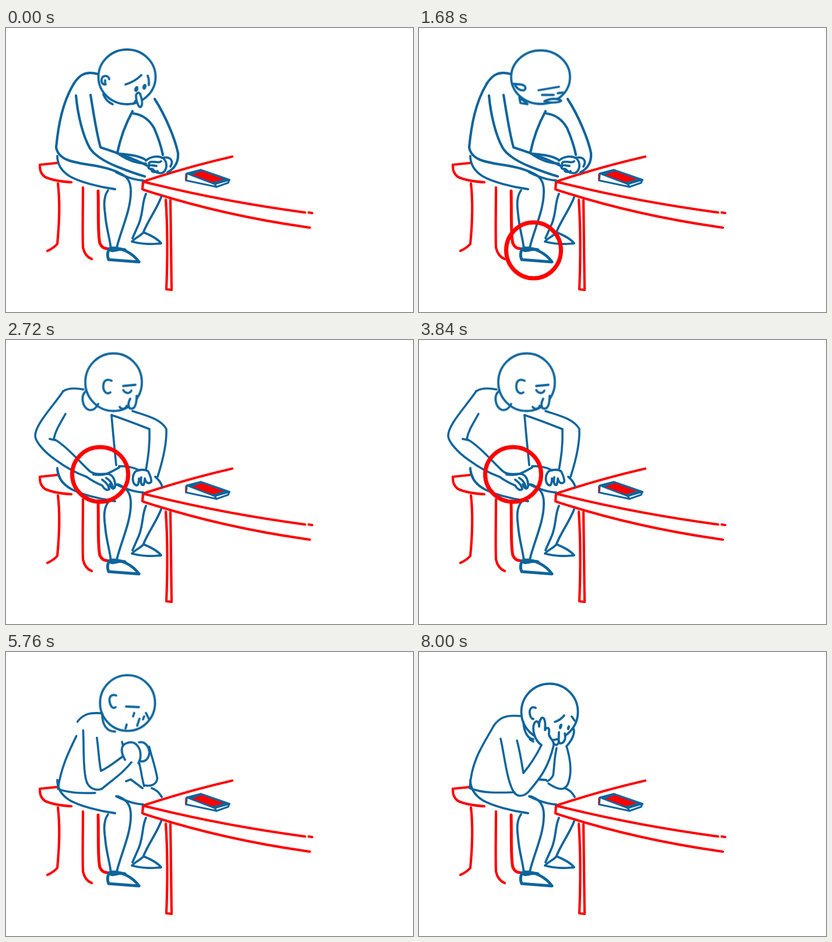
An HTML page without scripts that plays this animation: 698x488 px, repeating every 8.24 s.

```html
<!DOCTYPE html>
<html lang="en">
<head>
<meta charset="utf-8">
<title>Waiting by the phone</title>
<style>
html, body { margin: 0; width: 100%; height: 100%; overflow: hidden; background: #fff; }
svg { display: block; width: 100%; height: 100%; }
path, ellipse { fill: none; stroke-linecap: round; stroke-linejoin: round; }
.blue { stroke: #0d659c; stroke-width: 3.8; }
.red { stroke: #f00; stroke-width: 4.2; }
.ring { stroke: #f00; stroke-width: 7; }
.white { fill: #fff; }
.ink { fill: #0d659c; stroke: none; }
.bold { stroke-width: 5; }
.fine { stroke-width: 3.3; }

/* body strokes: a hands clasped, b fiddling, c hands on knees, d fists, e head in hands */
.limb { animation: pose 8.24s infinite; }
@keyframes pose {
  0%, 21.36% { d: var(--a); stroke-width: 4.2; animation-timing-function: ease-in-out; }
  25.24%, 27.18% { d: var(--b); stroke-width: 3.7; animation-timing-function: cubic-bezier(.4, 0, .4, 1.4); }
  33.01%, 65.05% { d: var(--c); stroke-width: 3.6; animation-timing-function: cubic-bezier(.4, -.4, .3, 1); }
  72.8%, 91.26% { d: var(--d); stroke-width: 3.6; animation-timing-function: ease-in-out; }
  97.09%, 100% { d: var(--e); stroke-width: 3.6; }
}

.head { animation: head 8.24s ease-in-out infinite; }
@keyframes head {
  0%, 7.77% { transform: translate(207.5px, 84px); }
  10.68%, 21.36% { transform: translate(208.5px, 84.5px); }
  25.24%, 27.18% { transform: translate(203px, 71.5px); }
  30.1% { transform: translate(191px, 59px); }
  33.01%, 47.57% { transform: translate(184.5px, 72.5px); }
  50.49%, 65.05% { transform: translate(186px, 72px); }
  72.8%, 91.26% { transform: translate(217.5px, 94px); }
  93.69% { transform: translate(221px, 90px); }
  97.09%, 100% { transform: translate(224px, 103px); }
}
.skull { animation: skull 8.24s ease-in-out infinite; }
@keyframes skull {
  0%, 7.77% { rx: 49px; ry: 47px; }
  10.68%, 21.36% { rx: 50.5px; ry: 46px; }
  25.24%, 47.57% { rx: 48.5px; ry: 49.5px; }
  50.49%, 65.05% { rx: 50px; ry: 51px; }
  72.8%, 91.26% { rx: 46px; ry: 46.5px; }
  97.09%, 100% { rx: 48.5px; ry: 48.5px; }
}

/* hard swaps */
.cut { opacity: 0; animation: 8.24s step-end infinite; }
@keyframes face1 { 0% { opacity: 1; } 8.74%, 100% { opacity: 0; } }
@keyframes face2 { 0% { opacity: 0; } 8.74% { opacity: 1; } 23.3%, 100% { opacity: 0; } }
@keyframes face3 { 0% { opacity: 0; } 23.3% { opacity: 1; } 29.13%, 100% { opacity: 0; } }
@keyframes face4 { 0% { opacity: 0; } 29.13% { opacity: 1; } 48.54%, 100% { opacity: 0; } }
@keyframes face5 { 0% { opacity: 0; } 48.54% { opacity: 1; } 68.93%, 100% { opacity: 0; } }
@keyframes face6 { 0% { opacity: 0; } 68.93% { opacity: 1; } 93.2%, 100% { opacity: 0; } }
@keyframes face7 { 0% { opacity: 0; } 93.2%, 100% { opacity: 1; } }
@keyframes clasp { 0% { opacity: 1; } 23.3%, 100% { opacity: 0; } }
@keyframes fiddle { 0% { opacity: 0; } 23.3% { opacity: 1; } 30.1%, 100% { opacity: 0; } }
@keyframes knees { 0% { opacity: 0; } 30.1% { opacity: 1; } 68.93%, 100% { opacity: 0; } }
@keyframes ringFoot { 0% { opacity: 0; } 8.74% { opacity: 1; } 29.13%, 100% { opacity: 0; } }
@keyframes ringHand { 0% { opacity: 0; } 32.04% { opacity: 1; } 66.02%, 100% { opacity: 0; } }
@keyframes toeUp {
  0% { opacity: 0; } 10.68% { opacity: 1; } 12.62% { opacity: 0; } 14.56% { opacity: 1; }
  16.5% { opacity: 0; } 18.45% { opacity: 1; } 20.39%, 100% { opacity: 0; }
}
@keyframes toeDown {
  0% { opacity: 1; } 10.68% { opacity: 0; } 12.62% { opacity: 1; } 14.56% { opacity: 0; }
  16.5% { opacity: 1; } 18.45% { opacity: 0; } 20.39%, 100% { opacity: 1; }
}

/* hands travelling into place */
.slide { animation: 8.24s ease-out infinite; }
@keyframes toKnee { 0%, 30.1% { transform: translate(28px, -4px); } 33.01%, 100% { transform: none; } }
@keyframes toChin { 0%, 68.93% { transform: translate(-16px, 28px); } 72.8%, 100% { transform: none; } }
.drum { transform-origin: 145px 232px; animation: drum 8.24s step-end infinite; }
@keyframes drum {
  0% { transform: none; } 36.89% { transform: rotate(-9deg); } 38.83% { transform: none; }
  42.72% { transform: rotate(-9deg); } 44.66% { transform: none; }
  52.43% { transform: rotate(-9deg); } 54.37% { transform: none; }
  58.25% { transform: rotate(-9deg); } 59.22%, 100% { transform: none; }
}
</style>
</head>
<body>
<svg viewBox="0 0 698 488" preserveAspectRatio="none">
  <!-- stool and table -->
  <g class="red">
    <path d="M87 232L58 235C58 245 60 251 67 256C80 262 96 264 112 265"/>
    <path d="M89 267C93 300 91 340 88 371Q82 378 71 383"/>
    <path d="M132 274C132 310 131 350 132 377Q135 392 147 397"/>
    <path class="bold" d="M158 280C159 320 157 355 161 370Q165 379 173 379"/>
    <path d="M388 221C340 232 280 249 235 264L234 277"/>
    <path d="M235 264Q370 298 513 317M519 317L525 318"/>
    <path d="M236 278Q370 322 521 343"/>
    <path d="M274 295C277 340 277 400 275 449L284 450C283 400 283 350 282 296"/>
  </g>

  <!-- phone -->
  <g class="blue fine">
    <path class="white" d="M310 250L334 244L383 261L381 266L361 273L309 262Z"/>
    <path style="fill:#0d659c" d="M311 250L334 244L383 261L358 268Z"/>
    <path style="fill:red;stroke:none" d="M319 252L336 246L374 260L354 265Z"/>
    <path d="M358 268L361 273"/>
    <path style="stroke:red;stroke-width:1.6" d="M308 251V262"/>
  </g>

  <!-- legs and shoes -->
  <g class="blue">
    <path d="M88 220C88 236 96 246 108 254C124 264 158 273 187 277"/>
    <path d="M192 248C208 254 215 264 214 284C213 315 198 345 190 377"/>
    <path d="M175 279C167 290 168 305 170 320C172 345 178 360 180 380"/>
    <path d="M240 285C233 300 236 315 228 336L217 361M266 291C258 312 244 330 236 350"/>
    <path d="M189 248C205 256 220 261 235 262"/>
    <path d="M236 351C245 355 258 360 266 370C250 372 230 371 216 367C222 360 230 358 236 351Z"/>
    <g class="cut" style="animation-name:toeDown">
      <path class="white bold" d="M181 378C197 377 217 386 228 402L176 398C173 391 174 385 177 379C181 388 192 377 204 381"/>
    </g>
    <g class="cut" style="animation-name:toeUp">
      <path class="white bold" d="M180 377L179 395L240 372C215 371 195 380 184 383"/>
      <path class="ink" d="M180 391C200 385 220 377 240 371C215 388 200 393 179 397Z"/>
    </g>
  </g>

  <!-- torso -->
  <g class="blue">
    <path class="limb" style="
      --a:path('M157 79C135 73 125 82 116 96');
      --b:path('M152 69C122 70 100 80 90 97');
      --c:path('M133 85C118 82 106 83 98 88');
      --d:path('M173 110C150 108 138 112 128 127');
      --e:path('M173 110C150 108 138 112 128 127')"/>
    <path class="limb" style="
      --a:path('M116 96C97 128 90 165 86 205C92 240 150 228 192 248');
      --b:path('M90 97C75 130 80 170 88 210C97 238 150 229 192 248');
      --c:path('M88 222C89 228 91 234 94 240C99 247 105 252 112 256');
      --d:path('M128 127C112 158 95 190 88 234C105 240 135 241 162 239');
      --e:path('M128 127C110 160 90 185 87 234C110 243 135 242 164 241')"/>
    <path class="limb" style="
      --a:path('M217 143C205 165 196 190 191 214');
      --b:path('M197 134C193 160 188 185 185 217');
      --c:path('M181 129C183 155 186 185 189 215');
      --d:path('M203 160C206 166 208 170 210 175');
      --e:path('M190 150C192 152 194 153 196 154')"/>
  </g>

  <!-- head -->
  <g class="head blue">
    <ellipse class="skull white" rx="49" ry="47"/>
    <g class="cut" style="animation-name:face1"><g transform="translate(-207.5 -84)">
      <path d="M177 88C176 81 166 80 164 88C163 95 167 98 171 97M170 90V96"/>
      <path d="M167 114C170 122 176 128 183 131"/>
      <path d="M205 97C215 94 225 88 232 81M243 82C246 88 245 92 245 98"/>
      <path class="ink" d="M220 108C219 100 227 97 227 103C227 109 223 112 220 108ZM234 104C233 96 241 93 241 100C240 106 237 108 234 104Z"/>
      <path class="white" d="M224 113C221 118 226 135 230 136C235 134 234 125 230 113C228 110 226 111 224 113Z"/>
      <path d="M219 130L223 124"/>
    </g></g>
    <g class="cut" style="animation-name:face2"><g transform="translate(-208.5 -84.5)">
      <path d="M162 96L174 97C184 98 184 105 180 107C172 108 168 103 165 99"/>
      <path d="M172 119C178 126 184 126 186 131L174 129Z"/>
      <path d="M205 107L240 101M211 115L231 115M238 112L247 111"/>
      <path class="white" d="M215 126C225 120 240 121 244 125C240 129 222 129 215 126Z"/>
    </g></g>
    <g class="cut" style="animation-name:face3"><g transform="translate(-203 -71.5)">
      <ellipse cx="167" cy="76" rx="4.5" ry="9"/>
      <path d="M150 75C143 85 146 108 155 112C160 118 160 115 166 109"/>
      <path d="M196 87C205 82 210 81 217 80M189 93L202 97M235 90L242 100M226 101L236 104"/>
      <path class="ink" d="M188 105L206 111L207 119Z"/>
      <path class="white" d="M207 107C208 122 215 126 217 120L218 105"/>
    </g></g>
    <g class="cut" style="animation-name:face4"><g transform="translate(-184.5 -72.5)">
      <path d="M181 70C172 66 166 70 167 82C168 90 174 94 179 90"/>
      <path d="M137 88C128 95 130 115 142 120C150 122 155 116 158 110"/>
      <path d="M201 79L222 77M201 86C205 92 212 93 215 87"/>
      <path class="white" d="M213 101C208 110 210 118 215 118C222 118 224 108 224 96"/>
      <path d="M195 115C198 120 205 119 207 113"/>
    </g></g>
    <g class="cut" style="animation-name:face5"><g transform="translate(-186 -72)">
      <path d="M162 61C155 58 150 62 152 72C153 80 158 82 160 79"/>
      <path d="M137 87C128 95 130 115 142 120C150 122 155 116 159 112"/>
      <path class="bold" d="M182 70C190 70 198 66 203 66"/>
      <path d="M224 76C230 82 226 90 232 94M195 92C190 105 192 112 197 112C203 110 203 100 204 90"/>
      <path class="ink" d="M189 84C189 77 195 75 195 80C194 85 191 87 189 84ZM211 94C211 87 217 85 217 90C216 95 213 97 211 94Z"/>
      <path class="fine" d="M178 111C183 108 188 110 190 115"/>
    </g></g>
    <g class="cut" style="animation-name:face6"><g transform="translate(-217.5 -94)">
      <path d="M198 81C189 78 185 84 187 93C189 102 194 104 197 101"/>
      <path d="M174 112C174 132 182 143 196 143"/>
      <path d="M215 100L237 101M229 111L227 117M238 121L234 133M246 117L244 122M249 111L254 121M216 131L214 138"/>
    </g></g>
    <g class="cut" style="animation-name:face7"><g transform="translate(-224 -103)">
      <path d="M200 96C192 92 189 100 190 106C191 112 193 115 196 115"/>
      <path d="M179 120C180 140 188 149 196 150"/>
      <path d="M233 120C240 118 245 114 249 109M262 111L267 118"/>
      <path class="ink" d="M240 131C239 124 246 120 246 126C245 132 242 135 240 131ZM254 133C253 126 259 123 259 129C258 134 256 136 254 133Z"/>
      <path class="white" d="M240 138C240 150 238 156 242 157C250 157 252 148 250 140"/>
    </g></g>
  </g>

  <!-- far arm, then near arm -->
  <g class="blue">
    <path class="limb" style="
      --a:path('M255 122C273 150 290 190 295 215C296 230 290 241 277 248');
      --b:path('M225 117C240 140 270 155 285 172C310 195 298 215 272 234');
      --c:path('M217 122C240 130 265 135 275 153C276 180 268 210 260 235');
      --d:path('M252 172C253 195 254 210 256 232C254 238 245 236 234 228');
      --e:path('M253 162C260 185 262 205 257 222C252 240 240 238 222 226')"/>
    <path class="limb" style="
      --a:path('M219 147C234 149 246 158 254 172C261 188 266 203 269 218');
      --b:path('M200 150C220 154 250 168 270 187C276 183 268 192 260 206');
      --c:path('M181 129C205 137 225 145 246 153C247 180 244 200 240 223');
      --d:path('M232 178C232 192 230 205 228 215C230 225 233 228 236 232');
      --e:path('M236 165C232 180 232 200 230 212C228 216 224 220 220 222')"/>
    <path class="limb" style="
      --a:path('M120 116C123 150 132 185 143 205C150 218 170 230 190 238C205 244 220 250 238 255');
      --b:path('M99 98C88 125 90 165 94 185C98 200 125 212 150 224C170 233 195 241 219 240');
      --c:path('M98 88C80 115 50 145 50 165C51 175 65 192 85 206C100 217 118 228 138 235');
      --d:path('M140 145C146 172 150 210 157 232C160 246 172 250 182 242C198 222 220 205 238 172');
      --e:path('M140 149C146 175 150 215 160 236C166 250 178 250 188 240C205 220 222 200 231 160')"/>
    <path class="limb" style="
      --a:path('M145 115C150 145 154 175 162 205C185 213 215 222 245 238');
      --b:path('M127 111C122 135 121 165 121 187C140 200 165 212 216 222');
      --c:path('M102 127C92 145 85 155 82 170C100 180 118 200 140 222');
      --d:path('M168 152C174 175 176 195 181 212C195 202 210 180 217 168');
      --e:path('M168 152C173 170 176 190 179 208C190 195 200 180 210 160')"/>
  </g>

  <!-- hands -->
  <g class="blue">
    <g class="cut" style="animation-name:clasp">
      <path d="M192 216C210 217 230 220 240 227M195 218C210 228 225 233 240 233"/>
      <path class="white" d="M240 228C248 220 262 219 270 224C278 232 276 245 268 249C262 250 256 248 252 243"/>
      <path d="M266 229C262 233 258 229 252 230C246 229 243 233 247 236C241 238 245 243 250 242C248 247 254 249 260 246M250 236L258 237M268 223C282 220 288 228 282 238"/>
    </g>
    <g class="cut" style="animation-name:fiddle">
      <path d="M186 219C205 216 230 218 246 228M252 236C266 236 272 244 269 252"/>
      <path d="M216 222C225 220 235 226 240 232M217 240C228 246 236 243 240 236M219 232L232 230M222 238L238 240"/>
      <path d="M258 205C250 212 240 203 231 208C238 211 247 211 251 214C243 220 240 226 244 229M258 214C250 222 244 230 248 234M262 218C256 226 252 234 260 234M268 222C266 228 274 230 272 236"/>
    </g>
    <g class="cut" style="animation-name:knees">
      <path d="M150 231C170 234 178 228 194 219M194 217C205 216 220 219 228 224M256 235C262 240 266 246 268 252M75 170L84 172"/>
      <path d="M244 226C240 222 228 222 222 226C215 234 217 246 222 249C226 252 228 246 228 238M232 236C230 244 232 250 236 249C238 244 238 240 238 238C240 246 245 248 249 244C250 238 246 230 244 226"/>
      <g class="slide" style="animation-name:toKnee"><g class="drum">
        <path d="M140 222C150 233 160 230 175 230C184 232 188 242 187 252C185 258 180 255 178 248"/>
        <path d="M138 235C145 240 155 246 165 250C168 256 174 260 177 256M165 240C172 245 176 250 177 256M172 237C180 242 182 248 184 255"/>
      </g></g>
    </g>
    <g class="cut" style="animation-name:face6">
      <path d="M206 222L214 219L234 234M250 234C257 236 263 242 267 249"/>
      <g class="slide" style="animation-name:toChin">
        <path class="white" d="M238 138C250 135 258 150 255 160C252 170 245 172 240 170"/>
        <path class="white" d="M214 168C206 155 206 142 218 139C232 134 243 148 240 166L237 174"/>
      </g>
    </g>
    <g class="cut" style="animation-name:face7">
      <path d="M206 219L218 220M250 234C257 236 263 242 267 249"/>
      <path class="white" d="M210 160C196 150 194 130 198 122C202 116 206 120 206 128C206 118 210 110 214 114C218 120 216 130 216 134C220 128 224 130 223 138C221 148 232 150 231 160"/>
      <path d="M232 158C236 162 239 158 240 154M253 162C262 152 268 140 265 132"/>
    </g>
  </g>

  <ellipse class="ring cut" style="animation-name:ringFoot" cx="196.500" cy="382" rx="47" ry="48"/>
  <ellipse class="ring cut" style="animation-name:ringHand" cx="161.500" cy="231" rx="48" ry="47"/>
</svg>
</body>
</html>
```
